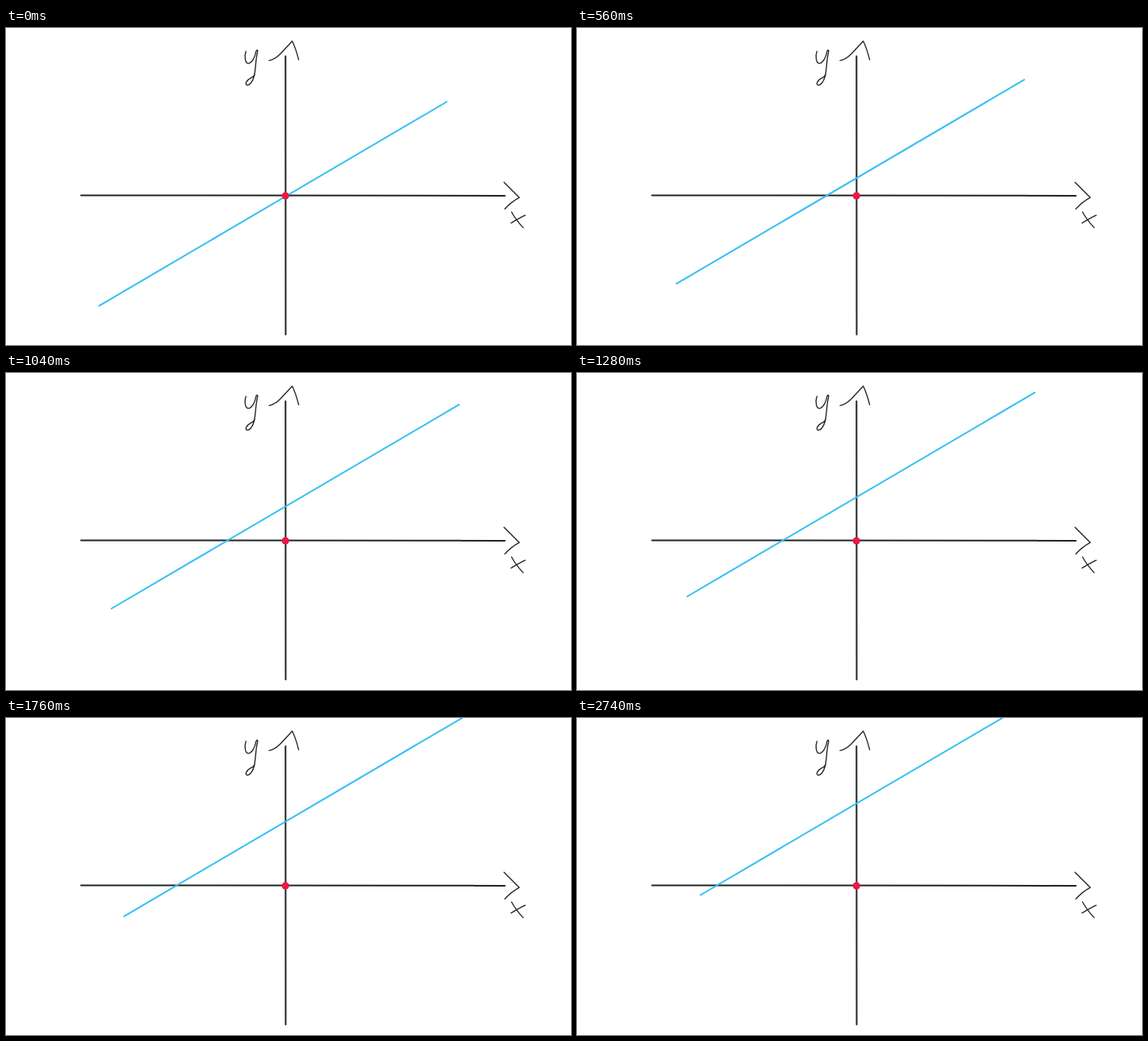
An HTML page for the animation above (2840 ms loop, 700 px wide and 393 px high).

```html
<!DOCTYPE html>
<html lang="en">
<head>
<meta charset="utf-8">
<title>Shifting a line</title>
<style>
  html, body { margin: 0; width: 100%; height: 100%; overflow: hidden; background: #fff; }
  svg { display: block; width: 100%; height: 100%; }
  path { fill: none; stroke: #1f2424; stroke-linecap: round; stroke-linejoin: round; }
  .axis { stroke-width: 2; }
  .pen { stroke-width: 1.35; }
  #line { stroke: #35bff3; stroke-width: 2; }
</style>
</head>
<body>
<svg viewBox="0 0 700 393">
  <path class="axis" d="M93 207.5L618 207.9M346.3 35L346.5 380"/>
  <path class="pen" d="M326 40.3C331 39.5 336 36 340 32L354.6 16.2C357.5 22 360.5 31 362.6 39.3"/>
  <path class="pen" d="M617 191.3L636 210.2C629 214 623 219 618 224.2"/>
  <path class="pen" d="M297.2 29C295.2 35 296.2 43.5 300 43.8C304.5 44 308.5 36 309.3 31C310 26.5 312.4 26.5 311.6 30C309 40 309.6 51 307.3 60C305.5 67 301.5 71.5 298.5 70.8C295.5 69.5 298.5 64.5 303 62.2C305.5 61 307.3 59.5 308.2 57.6"/>
  <path class="pen" d="M626.3 228C630 235 635.5 242 640.8 247.6M643.3 232.2C637 235 631.5 238.5 625.8 241.8"/>
  <circle cx="346.2" cy="208.1" r="4.6" fill="#ed1747"/>
  <path id="line" d="M0 0L430.6 -252.8"/>
</svg>
<script>
  const LOOP = 2840, STEP = 80, HOLD = 2740;
  // [step, x, y] of the line's lower end
  const keys = [
    [0, 115.5, 344.3], [4, 120.6, 331], [9, 125.4, 307.5], [13, 130.8, 292],
    [18, 140.6, 267], [26, 152, 224.6], [27, 153, 219.5]
  ];
  const line = document.getElementById("line");
  const dot = document.querySelector("circle");

  function position(step) {
    const i = Math.max(1, keys.findIndex(k => k[0] >= step));
    const [s0, x0, y0] = keys[i - 1], [s1, x1, y1] = keys[i];
    const p = (step - s0) / (s1 - s0);
    return [x0 + (x1 - x0) * p, y0 + (y1 - y0) * p];
  }

  function draw(now) {
    const t = now % LOOP;
    const step = t >= HOLD ? 27 : Math.min(26, Math.floor(t / STEP));
    line.setAttribute("transform", `translate(${position(step)})`);
    line.after(dot);
    requestAnimationFrame(draw);
  }
  draw(performance.now());
</script>
</body>
</html>
```
